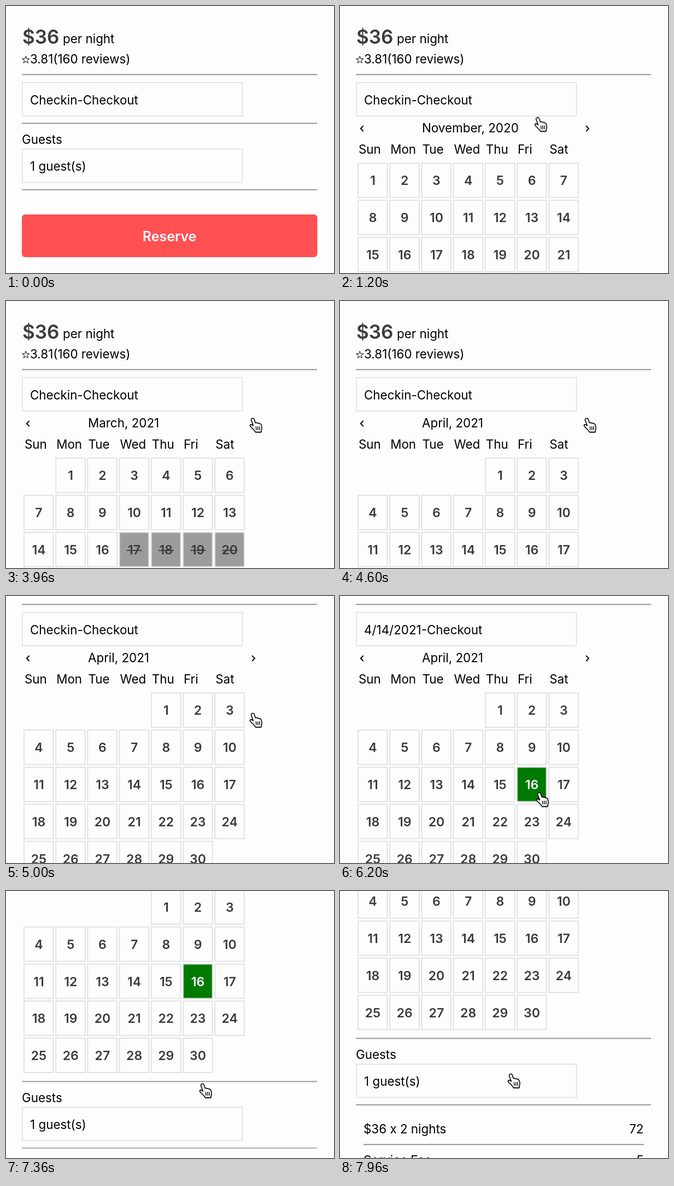
Animation of 600 by 488 pixels, one loop 8000 ms. Source, as an HTML page:

```html
<!DOCTYPE html>
<html lang="en">
<head>
<meta charset="utf-8">
<title>Booking widget</title>
<style>
html, body { margin: 0; width: 100%; height: 100%; overflow: hidden; background: #fdfdfd; }
svg { display: block; width: 100%; height: 100%; }
text { font: 22.4px Inter, "Open Sans", sans-serif; fill: #000; }
.price { font-size: 35px; font-weight: 600; fill: #3c3c3c; }
.button { font-size: 25px; font-weight: 600; fill: #fff; text-anchor: middle; }
.amount { text-anchor: end; }
.field { fill: none; stroke: #e0e2e2; stroke-width: 1.7; }
.chevron { fill: none; stroke: #000; stroke-width: 1.9; }
.cell rect { fill: #fdfdfd; stroke: #dde1e0; stroke-width: 1.8; }
.cell text { font-size: 23px; font-weight: 600; fill: #3a3a3a; text-anchor: middle; }
.cell.taken rect { fill: #9c9c9c; }
.cell.taken line { stroke: #3a3a3a; stroke-width: 1.8; }
.cell.hover rect { fill: #007a00; }
.cell.hover text { fill: #fff; }

#page { animation: scroll 8s linear infinite; }
#lower { animation: push 8s step-end infinite; }
#cursor { animation: point 8s linear infinite; }

@keyframes scroll {
  0%, 58% { transform: translateY(0); animation-timing-function: ease-in-out; }
  62.5%, 82.5% { transform: translateY(-110px); animation-timing-function: ease-in-out; }
  92% { transform: translateY(-289px); animation-timing-function: ease-out; }
  96.5%, 100% { transform: translateY(-368px); }
}
@keyframes push {
  0% { transform: translateY(0); }
  9%, 100% { transform: translateY(423px); }
}
@keyframes point {
  0%, .5% { transform: translate(371px, 399px); animation-timing-function: ease-in-out; }
  4.5%, 9.5% { transform: translate(227px, 187px); animation-timing-function: ease-in-out; }
  19.5%, 63.5% { transform: translate(445px, 213px); }
  65% { transform: translate(363px, 265px); }
  68.25%, 72% { transform: translate(228px, 350px); animation-timing-function: ease-in-out; }
  76%, 83% { transform: translate(358px, 358px); }
  92%, 96.5% { transform: translate(353px, 351px); animation-timing-function: ease-in-out; }
  99.5%, 100% { transform: translate(306px, 333px); }
}
</style>
</head>
<body>
<svg viewBox="0 0 600 488">
  <defs>
    <g id="rule">
      <rect width="540" height="1.6" fill="#858585"/>
      <rect y="1.6" width="540" height="1.2" fill="#e6e6e6"/>
    </g>
  </defs>
  <g id="page">
    <text class="price" x="30" y="69">$36</text>
    <text x="104" y="68">per night</text>
    <path id="star" fill="none" stroke="#000"/>
    <text x="44" y="105">3.81(160 reviews)</text>
    <use href="#rule" x="29" y="124.5"/>
    <rect class="field" x="30" y="140" width="402.5" height="61"/>
    <g id="dates"></g>
    <g id="calendar"></g>
    <g id="lower">
      <use href="#rule" x="29" y="213.5"/>
      <text x="29" y="252">Guests</text>
      <rect class="field" x="30" y="261.5" width="402.5" height="61"/>
      <text x="44" y="301">1 guest(s)</text>
      <use href="#rule" x="29" y="335"/>
      <g id="reserve">
        <rect x="29" y="381" width="540.5" height="78" rx="6" fill="#ff5052"/>
        <text class="button" x="299" y="429.5">Reserve</text>
      </g>
      <g id="costs">
        <text x="43" y="388">$36 x 2 nights</text>
        <text class="amount" x="555.5" y="388">72</text>
        <rect x="43" y="407.5" width="513" height="1.6" fill="#858585"/>
        <rect x="43" y="409.1" width="513" height="1.2" fill="#e6e6e6"/>
        <text x="43" y="445">Service Fee</text>
        <text class="amount" x="555.5" y="445">5</text>
      </g>
    </g>
  </g>
  <g id="cursor">
    <g id="hand" stroke-linecap="round" stroke-linejoin="round">
      <path transform="translate(.5 2)" opacity=".25" d="M5.5 1.6C7 .9 8.6 1.6 9.2 3.4L11.3 9.8 18 11.2 21.8 13.2C22.8 16 23.6 18.6 22.6 21.4L21.8 26.6H11.4C9.6 23 6 20 2.2 16.4L7.4 15 3.6 5Z"/>
      <path fill="#fff" stroke="#000" stroke-width="1.6" d="M5.5 1.6C7 .9 8.6 1.6 9.2 3.4L11.3 9.8C12.4 8.9 14 9.2 14.6 10.4 15.8 9.5 17.4 10 18 11.2 19.6 10.6 21.2 11.4 21.8 13.2 22.8 16 23.6 18.6 22.6 21.4L21.8 26.6H11.4C9.6 23 6 20 2.2 16.4 .6 14.6 1.6 12.6 3.6 12.9 5 13.1 6.2 14 7.4 15L3.6 5C3 3.4 4 2.1 5.5 1.6Z"/>
      <path fill="none" stroke="#000" stroke-width="1.4" d="M12.4 16.8l.5 5.6M15.6 16.6l.3 5.8M18.8 16.4l.2 6"/>
    </g>
  </g>
</svg>
<script>
const LOOP = 8000;
const SVG = 'http://www.w3.org/2000/svg';
const sheet = document.styleSheets[0];
const byId = id => document.getElementById(id);
let windows = 0;

function add(parent, tag, attributes, content = '') {
  const node = document.createElementNS(SVG, tag);
  for (const key in attributes) node.setAttribute(key, attributes[key]);
  node.textContent = content;
  return parent.appendChild(node);
}

// Shows a node only between two moments of the loop.
function during(node, from, to = LOOP) {
  const name = `window${windows++}`;
  const at = (ms, value) => `${ms / LOOP * 100}% { visibility: ${value}; }`;
  const start = from > 0 ? at(0, 'hidden') : '';
  const end = to < LOOP ? at(to, 'hidden') : '';
  sheet.insertRule(`@keyframes ${name} { ${start} ${at(from, 'visible')} ${end}
    100% { visibility: ${to < LOOP ? 'hidden' : 'visible'}; } }`, sheet.cssRules.length);
  node.style.animation = `${name} ${LOOP}ms step-end infinite`;
}

function addCell(parent, day, firstWeekday, state = '') {
  const slot = day - 1 + firstWeekday;
  const x = 33 + slot % 7 * 58.2;
  const y = 287.3 + Math.floor(slot / 7) * 67.8;
  const cell = add(parent, 'g', { class: `cell ${state}` });
  add(cell, 'rect', { x, y, width: 53.6, height: 62.8 });
  add(cell, 'text', { x: x + 27, y: y + 40 }, day);
  if (state === 'taken') {
    const half = day < 10 ? 7.5 : 14;
    add(cell, 'line', { x1: x + 27 - half, x2: x + 27 + half, y1: y + 33, y2: y + 33 });
  }
  return cell;
}

function addMonth({ title, first, days, from, to, taken = [] }) {
  const month = add(calendar, 'g');
  add(month, 'text', { x: 150, y: 231 }, title);
  for (let day = 1; day <= days; day++) {
    const isTaken = taken.some(([a, b]) => day >= a && day <= b);
    addCell(month, day, first, isTaken ? 'taken' : '');
  }
  during(month, from, to);
}

const calendar = byId('calendar');
const frame = add(calendar, 'g');
const highlight = add(calendar, 'rect', { x: 445, y: 206, width: 15, height: 33, fill: '#a9cff8' });
const chevrons = add(calendar, 'path', { class: 'chevron', d: 'M42.6 219l-4.8 5 4.8 5M450.2 219l4.8 5-4.8 5' });
['Sun', 'Mon', 'Tue', 'Wed', 'Thu', 'Fri', 'Sat'].forEach((name, i) =>
  add(frame, 'text', { x: 34 + i * 58.2, y: 270 }, name));
during(frame, 720);
during(chevrons, 720);
during(highlight, 2200, 2720);

[
  { title: 'November, 2020', first: 0, days: 30, from: 720, to: 1840 },
  { title: 'December, 2020', first: 2, days: 31, from: 1840, to: 2400, taken: [[1, 3], [10, 12], [14, 19]] },
  { title: 'January, 2021', first: 5, days: 31, from: 2400, to: 2720, taken: [[8, 12]] },
  { title: 'February, 2021', first: 1, days: 28, from: 2720, to: 3960 },
  { title: 'March, 2021', first: 1, days: 31, from: 3960, to: 4400, taken: [[17, 20]] },
  { title: 'April, 2021', first: 4, days: 30, from: 4400 }
].forEach(addMonth);

// Days of April that the pointer passes over.
[
  [3, 5060, 5110], [10, 5120, 5180], [9, 5180, 5290], [8, 5295, 5330], [15, 5336, 5400],
  [14, 5405, 5840], [15, 5845, 5930], [16, 5935, 7760]
].forEach(([day, from, to]) => during(addCell(calendar, day, 4, 'hover'), from, to));

[
  ['Checkin-Checkout', 0, 5640],
  ['4/14/2021-Checkout', 5640, 6400],
  ['4/14/2021-4/16/2021', 6400, LOOP]
].forEach(([label, from, to]) => during(add(byId('dates'), 'text', { x: 44, y: 179.5 }, label), from, to));

during(byId('reserve'), 0, 6400);
during(byId('costs'), 6400);
during(byId('hand'), 40);

const tips = Array.from({ length: 10 }, (_, i) => {
  const radius = i % 2 ? 2.8 : 7;
  const angle = i * Math.PI / 5 - Math.PI / 2;
  return `${36.3 + radius * Math.cos(angle)} ${98.5 + radius * Math.sin(angle)}`;
});
byId('star').setAttribute('d', `M${tips.join('L')}Z`);
</script>
</body>
</html>
```
